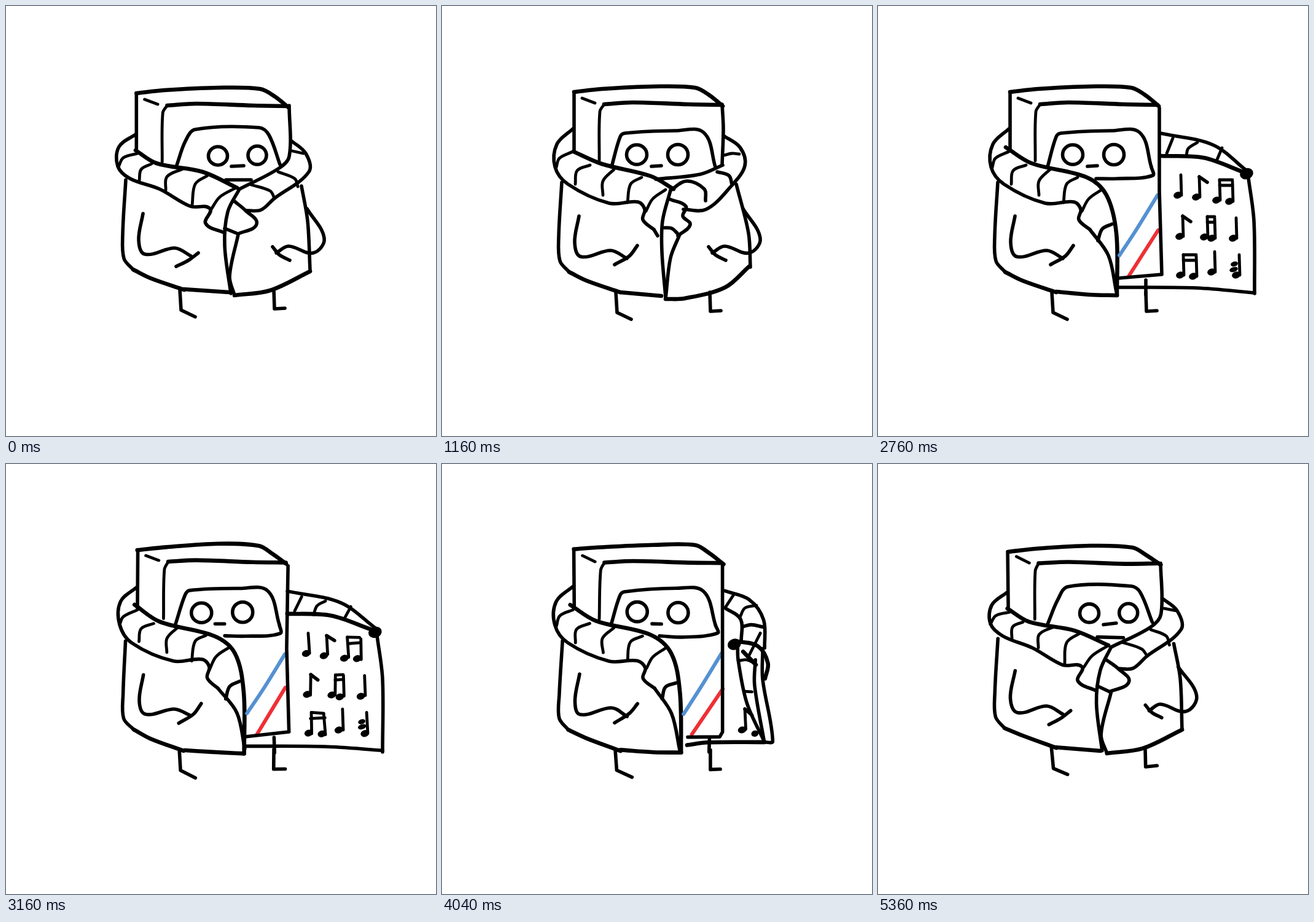
An HTML page with a canvas that plays this animation: 700 by 700 pixels, repeating every 5.44 s.

```html
<!DOCTYPE html>
<html lang="en">
<head>
<meta charset="utf-8">
<title>Coat</title>
<style>
html, body { margin: 0; width: 100%; height: 100%; overflow: hidden; background: #fff; }
canvas { display: block; width: 700px; height: 700px; }
</style>
</head>
<body>
<canvas id="stage" width="700" height="700"></canvas>
<script>
// One stroke per line: an optional kind, then points "x y".
// o oval, d dot, p straight corners, t thin, h heavy, b blue, r red,
// n note, f note with flag, m pair of notes (x y gap)
const pens = { t: [4.8, '#000'], h: [6.6, '#000'], b: [6, '#5591d2'], r: [6, '#ee3035'] };
const basePen = [5.6, '#000'];

function note(kind, [x, y, gap]) {
  const top = y - 33;
  const parts = [{ kind: 't', n: [x, top, x + 1, y] }, { kind: 'd', n: [x - 5, y, 7, 5.5] }];
  if (kind === 'f') parts.push({ kind: '', n: [x, top, x + 13, top + 9] });
  if (kind === 'm') {
    for (const bar of [top, top + 9]) parts.push({ kind: 't', n: [x, bar, x + gap, bar] });
    parts.push(...note('n', [x + gap, y + 2]));
  }
  return parts;
}

const sketch = text => text.trim().split('\n').flatMap(line => {
  const words = line.trim().split(/[\s,]+/);
  const kind = isNaN(words[0]) ? words.shift() : '';
  const n = words.map(Number);
  return 'nfm'.includes(kind) && kind ? note(kind, n) : [{ kind, n }];
});

const round = kind => kind === 'o' || kind === 'd';
const moved = (strokes, stretch, hinge, dy = 0) => strokes.map(({ kind, n }) => ({
  kind,
  n: n.map((v, i) => round(kind) && i > 1 ? v : i % 2 ? v + dy : hinge + (v - hinge) * stretch)
}));

const head = sketch(`
h 215 140,260 135,345 131,412 133,435 145,457 163
t 256 252,257 172,264 160
h 264 160,310 157,400 160,455 161
215 141,215 234
t 228 150,249 158
`);

const legs = sketch(`
195 287,190 375,192 415,207 433
h 207 433,235 447,290 466
223 342,216 385,226 408,275 398,301 411
p 283 466,285 499,308 510
p 436 466,437 497,454 496
`);

const grip = sketch(`
434 392,445 405,462 414
440 402,460 391,500 402,518 378,490 330
`);

const sideFace = sketch(`
276 262,290 213,298 207,380 203,426 206,445 262
o 317 242 16.5 16
o 384 242 16.5 16.5
341 261,357 260
`);

const leftCollar = sketch(`
213 200,187 225,184 262,205 290,272 321,319 319,330 331,327 348,345 364
t 186 263,191 248,213 237
t 217 290,220 268,241 259
t 262 308,262 285,280 266
t 302 320,307 290,325 279
t 332 334,343 314,364 299
318 390,305 407,281 421
`);

const shutFace = sketch(`
278 259,292 220,308 201,412 198,428 210,446 258
358 283,399 283
o 345 244 15.5 15
o 409 243 15 15
367 261,387 260
461 162,461 245,443 265,380 298
h 211 235,245 256,320 270,376 296
`);

const shutCollar = sketch(`
211 209,184 229,182 261,202 281,250 298,300 326,332 330,325 354,355 369
t 183 262,191 247,214 240
t 217 284,220 266,237 257
t 260 300,262 278,288 265
t 303 324,308 290,328 276
t 334 331,348 311,374 296
464 219,488 240,493 270,436 314,415 332,392 333
t 466 236,484 240
t 443 270,470 281,475 294
t 399 291,430 301,437 313
`);

const shutCoat = sketch(`
380 298,361 335,356 390,366 468
372 318,390 333,408 355,378 371
356 362,378 371
378 372,364 440,372 471
h 289 461,363 466
h 372 471,430 463,495 432
481 293,491 350,495 430
313 402,297 414,277 424
`);

const glanceCollar = sketch(`
456 160,458 200,456 258
457 259,420 274,348 282
h 214 237,260 257,340 277,377 298
458 211,485 230,493 260,470 294,430 331,393 331
t 459 243,472 240,484 241
448 270,467 276,472 290
372 300,398 285,427 298,429 317
`);

const glanceCoat = sketch(`
372 300,359 350,358 400,364 474
372 315,397 326,392 342,404 356,384 374
362 361,374 362,384 371
345 364,351 374
387 372,372 410,364 476
h 290 466,357 472
h 364 477,395 476,461 458,500 424
479 290,499 370,502 425
`);

const openFront = sketch(`
445 262,447 276,390 281,355 281
h 208 230,250 256,340 279,372 308,388 370,389 471
345 364,375 406,388 465
358 382,365 363,381 355
b 455 308,420 365,393 406
r 456 365,408 440
h 290 465,345 470,389 471
436 446,436 470
`);

const flapHalf = sketch(`
p 458 166,458 372
p 461 428,458 442,392 444
h 459 207,510 222,540 262
h 459 243,505 243,532 266
t 462 240,474 215
t 490 237,500 229,522 227
d 532 266 12 8
540 268,534 330,525 415
h 525 412,436 428
538 278,480 345,442 405,437 428
h 541 262,547 300,539 328
n 491 311
t 521 345,527 373
525 416,475 449,392 460
`);

const flapWide = sketch(`
p 458 166,458 300,462 437,392 443
459 207,545 226,600 268
h 459 244,530 247,594 270
t 470 240,480 215
t 502 244,505 232,520 222
t 552 250,560 231
d 600 273 11 9
603 280,612 350,613 468
389 458,519 459,613 467
n 493 308
f 523 311
m 556 316 21
f 496 375
m 536 376 12
n 583 378
m 497 438 21
n 548 433
n 588 438
d 580 420 6 4
d 579 429 7 4
`);

const flapFold = sketch(`
p 458 166,457 437,452 443,392 444
459 207,505 221,534 255,533 300
461 234,490 252,490 287
t 461 233,478 212
t 490 247,498 236,518 230
494 264,510 261,530 266
t 505 313,528 275
d 477 293 11 9
h 484 288,522 296,542 325,535 349
h 495 305,518 328
485 292,484 320,503 390,535 453
518 320,517 360,535 452
531 300,532 350,550 450,535 453
t 484 321,500 318,515 325
t 497 370,512 370
h 390 458,430 453,535 453
f 499 432
d 515 440 6 5
`);

const shut = [...moved(head, 1.022, 337, 2), ...shutFace, ...shutCollar, ...shutCoat,
  ...moved(legs, 1, 0, -4), ...grip];
const glance = [...head, ...sideFace, ...leftCollar, ...glanceCollar, ...glanceCoat, ...legs, ...grip];
const open = (flap, stretch = 1) => [...head, ...sideFace, ...leftCollar, ...openFront, ...legs,
  ...moved(flap, stretch, 457)];

// first step, step where the wobble rests, strokes
const scenes = [
  [0, 0, shut],
  [10, 14, glance],
  [15, 15, open(flapFold, 0.86)],
  [18, 24, open(flapHalf)],
  [25, 25, open(flapWide, 1.06)],
  [27, 34, open(flapWide)],
  [43, 43, open(flapHalf)],
  [44, 44, open(flapFold)],
  [46, 46, open(flapFold, 0.88)],
  [51, 57, glance],
  [61, 0, shut]
];

const STEP = 80, STEPS = 68;
const ctx = document.getElementById('stage').getContext('2d');
ctx.lineCap = ctx.lineJoin = 'round';

const noise = (a, b) => {
  const s = Math.sin(a * 12.9898 + b * 78.233) * 43758.5453;
  return (s - Math.floor(s)) * 2 - 1;
};

// Smooth curve whose handles are a third of each span
function curve(p) {
  const handle = (at, from, to, reach) => {
    const dx = to[0] - from[0], dy = to[1] - from[1], k = reach / (Math.hypot(dx, dy) || 1);
    return [at[0] + dx * k, at[1] + dy * k];
  };
  for (let i = 0; i < p.length - 1; i++) {
    const b = p[i], c = p[i + 1], a = p[i - 1] || b, d = p[i + 2] || c;
    const reach = Math.hypot(c[0] - b[0], c[1] - b[1]) / 3;
    ctx.bezierCurveTo(...handle(b, a, c, reach), ...handle(c, d, b, reach), ...c);
  }
}

function draw(strokes, seed) {
  const place = (x, y) => seed
    ? [x + noise(x + y, seed) * 1.4, y + noise(y - x, seed + 5) * 1.4] : [x, y];
  for (const { kind, n } of strokes) {
    [ctx.lineWidth, ctx.strokeStyle] = pens[kind] || basePen;
    ctx.beginPath();
    if (round(kind)) {
      ctx.ellipse(...place(n[0], n[1]), n[2], n[3], kind === 'd' ? -0.3 : 0, 0, 7);
      if (kind === 'd') ctx.fill(); else ctx.stroke();
      continue;
    }
    const points = [];
    for (let i = 0; i < n.length; i += 2) points.push(place(n[i], n[i + 1]));
    ctx.moveTo(...points[0]);
    if (kind === 'p') points.forEach(q => ctx.lineTo(...q));
    else curve(points);
    ctx.stroke();
  }
}

let shown = -1;
function tick() {
  const step = Math.floor(performance.now() / STEP) % STEPS;
  if (step !== shown) {
    shown = step;
    const [, rest, strokes] = scenes.filter(s => s[0] <= step).pop();
    ctx.fillStyle = '#fff';
    ctx.fillRect(0, 0, 700, 700);
    ctx.fillStyle = '#000';
    draw(strokes, ((step - rest) % 3 + 3) % 3);
  }
  requestAnimationFrame(tick);
}
tick();
</script>
</body>
</html>
```
